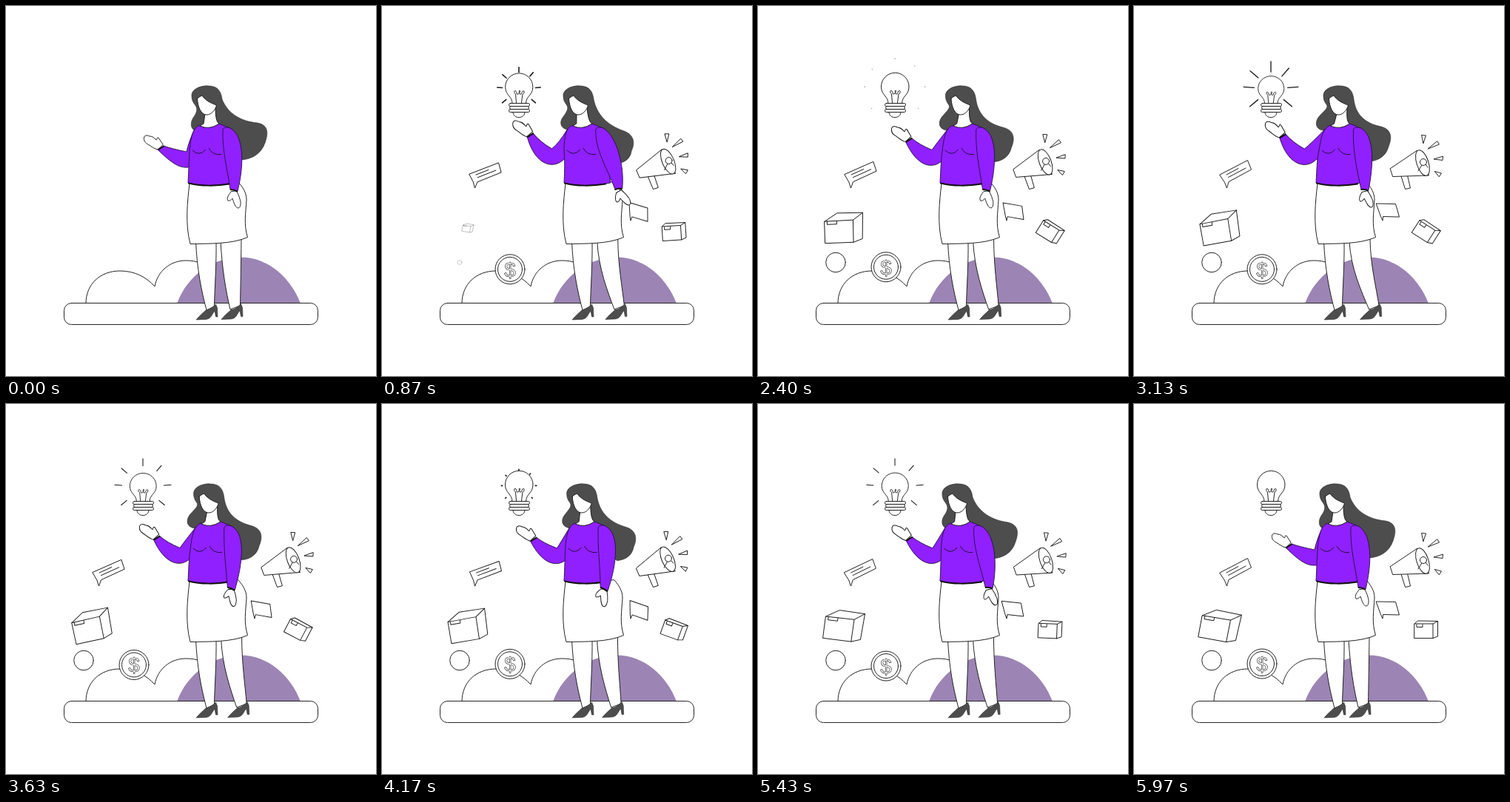
Animation, 500 px wide and 500 px high, one loop 6 s. Source, as an HTML page:

```html
<!DOCTYPE html>
<html lang="en">
<head>
<meta charset="utf-8">
<title>Presenting ideas</title>
<style>
  html, body { margin: 0; width: 100%; height: 100%; overflow: hidden; background: #fff; }
  svg { display: block; width: 100vw; height: 100vh; }
  .line { fill: #fff; stroke: #1a1a1a; stroke-width: .95; stroke-linejoin: round; stroke-linecap: round; }
  .open { fill: none; }
  .dark { fill: #4d4d4d; stroke: #2b2b2b; stroke-width: .6; }
  .top { fill: #9020ff; stroke: #241040; stroke-width: .9; stroke-linejoin: round; }
  .trim { fill: none; stroke: #111; stroke-width: 2; stroke-linecap: round; }
  text.line { font: 28px "Liberation Sans", Arial, sans-serif; text-anchor: middle; stroke-width: .6; }
</style>
</head>
<body>
<svg viewBox="0 0 500 500" xmlns="http://www.w3.org/2000/svg">
  <path class="line" d="M108 402C108 375 128 358 154 358C175 358 190 367 201 379C205 358 222 344 243 344C251 344 257 345 262 347V402Z"/>
  <path fill="#9c84b4" d="M231 402C245 364 280 339.500 317 339.500C355 339.500 385 368 398 402Z"/>
  <rect class="line" x="78.500" y="401.500" width="343" height="29" rx="10"/>

  <g id="bulb">
    <g id="glass">
      <path class="line" d="M176 132C176 121 166.500 121 166.500 109A18.700 18.700 0 0 1 204 109C204 121 194.500 121 194.500 132Z"/>
      <path class="line open" d="M181.500 131L180.500 119C177 116 179 113 181 115C183 117 181 119 183 119C187 119 184 114 186 114C188 114 184 119 187 119C190 119 188 116 190 115C193 113 193 118 190 119L188.500 131"/>
    </g>
    <path class="line" d="M177 143.500C177 153 193 153 193 143.500Z"/>
    <rect class="line" x="171.500" y="131.500" width="28" height="4" rx="2"/>
    <rect class="line" x="172.500" y="135.500" width="26" height="4" rx="2"/>
    <rect class="line" x="171.500" y="139.500" width="28" height="4" rx="2"/>
  </g>
  <path id="rays" class="line open"/>

  <g id="chat">
    <path class="line" d="M116 228L153.500 208.500L158.500 221L128 237.500L125.500 246L122.500 238.500Z"/>
    <path class="line open" d="M125 228L141 219.500M127.500 231.500L151 219"/>
  </g>

  <g id="horn">
    <path class="line" d="M361 230L366.500 247.500L373.500 246L369.500 229Z"/>
    <path class="line" d="M346.500 219.500L383 195L398.500 229L350 230.500Z"/>
    <ellipse class="line" cx="390" cy="212" rx="8" ry="18" transform="rotate(-18 390 212)"/>
    <path class="line open" d="M384 223L389 215M394 214L397 218"/>
    <circle class="line" cx="391" cy="211" r="4.500"/>
    <path class="line" d="M389 174.500L394.500 175L391 185.500ZM410 183L412.500 187L397.500 193ZM417.500 203.500L417 208.500L405.500 207ZM406.500 223.500L415.500 226L412.500 230.500Z"/>
  </g>

  <path id="flag" class="line" d="M327.500 267L353.500 267.500L358.500 285L336.500 284.500L336 290L333.500 284.500Z"/>

  <g id="smallBox">
    <path class="line" d="M379 297L383.500 293L410.500 293.500V314L404 316.500H379Z"/>
    <path class="line open" d="M379 297H404V316.500M404 297L410.500 293.500M382 298V301.500H390V298"/>
  </g>
  <g id="bigBox">
    <path class="line" d="M91 288.500L109 279L143.500 282L139.500 317L127 320.500L89 318Z"/>
    <path class="line open" d="M91 288.500L129.500 290.500L127 320.500M129.500 290.500L143.500 282M94.500 288.500L94 293L107 293.800L107.500 289.500"/>
  </g>
  <circle id="ball" class="line" cx="105" cy="346.500" r="13.300"/>
  <g id="coin">
    <circle class="line" cx="173" cy="351" r="20"/>
    <circle class="line" cx="173" cy="351" r="16.500"/>
    <text class="line" x="173" y="361">$</text>
  </g>

  <path id="hair" class="dark"/>
  <path class="line" d="M256.500 318C258 355 264 385 271 411L281.500 406C282 380 284.500 350 284 318Z"/>
  <path id="leg" class="line"/>
  <path id="shoe" class="dark" d="M257 424C262 418 266 415 270 411C275 411 279 407 283.500 403L285.500 408L286 420H283.500L282 412C278 417 277 423 270 423.500Z"/>
  <use id="frontShoe" href="#shoe"/>
  <path class="line" d="M248 240C245 265 242 295 249 321.500C275 321 305 322 326.500 312.500C321 295 324 280 325 262C325 252 320 245 314 238Z"/>
  <path id="hand" class="line" d="M3 -4L-3 -13C-6 -14 -4 -10 -6 -10C-9 -13 -11 -15 -15 -15C-19 -17 -22 -16 -22.500 -13C-23 -9 -21 -6 -17 -4C-12 -1 -9 2 -4 3Z"/>
  <path id="sleeve" class="top"/>
  <path id="wristband" class="trim"/>
  <path id="torso" class="top"/>
  <path class="trim" d="M247 239.500C262 243.500 285 243.500 302 240.500"/>
  <path id="chest" class="open" stroke="#241040"/>
  <path id="neck" class="line"/>
  <path id="face" class="line" d="M258.500 125C259 137 264 147 271 147C278 147 283 140 284.500 134C276 131 269 127 265 121C262 122 260 124 258.500 125Z"/>
  <path id="lowHand" class="line" d="M-4 1C-8 6 -10 10 -8 13C-6 14 -4 12 -2 10C0 16 2 23 6 23C9 23 10 15 8 11C7 6 5 4 4 0Z"/>
  <path id="arm" class="top"/>
  <path id="cuff" class="trim"/>
</svg>
<script>
const LOOP = 6000;
const RAY_START = 660, RAY_PERIOD = 1750;
const RAY_ANGLES = [-90, -49, -4, 40, 140, 184, 221];
const parts = {};
document.querySelectorAll('[id]').forEach(el => parts[el.id] = el);

const clamp = v => Math.max(0, Math.min(1, v));
const smooth = f => (1 - Math.cos(Math.PI * clamp(f))) / 2;
const mix = (a, b, f) => a + (b - a) * f;

// Eased value along [time, value] keys.
function track(t, keys) {
  const i = keys.findIndex(k => k[0] > t);
  if (i === 0) return keys[0][1];
  if (i < 0) return keys[keys.length - 1][1];
  const [t0, v0] = keys[i - 1], [t1, v1] = keys[i];
  return mix(v0, v1, smooth((t - t0) / (t1 - t0)));
}

const stride = [[0, 0], [1000, .76], [2000, .35], [3000, 1], [4000, .4], [4900, .9], [6000, 0]];
const reach = [[0, 0], [950, 1.06], [2000, .45], [3000, 1], [4000, .5], [5000, .95], [6000, 0]];
const headShift = [[0, 0], [900, -6], [3100, 5], [4450, -2], [5400, -2], [6000, 0]];
const hairShift = [[0, 0], [900, -13], [3100, -6], [4200, -10], [6000, 0]];
const armSwing = [[0, 0], [950, 12], [1900, -4], [2900, 5], [4100, -8], [5300, 4.5], [6000, 0]];
const tilt = [[0, 0], [1150, 1], [1700, 1], [3070, 0], [4200, 1], [4450, 1], [5960, 0]];
const bigBoxTurn = [[1000, 6], [3650, -16], [6000, 6.5]];
const smallBoxTurn = [[750, -4], [2700, 34], [6000, 0]];

const draw = (id, d) => parts[id].setAttribute('d', d);
const move = (id, value) => parts[id].setAttribute('transform', value);

function pop(id, t, start, cx, cy, extra = '') {
  const scale = smooth((t - start) / 400);
  parts[id].style.display = scale > 0 ? '' : 'none';
  move(id, `${extra} translate(${cx} ${cy}) scale(${scale}) translate(${-cx} ${-cy})`);
}

function drawBulb(t) {
  pop('bulb', t, 50, 185, 120);
  const age = t - RAY_START;
  const p = age < 0 ? 0 : age / RAY_PERIOD % 1;
  const squeeze = Math.sin(Math.PI * p) ** 2;
  move('glass', `translate(185 132) scale(${1 - .07 * squeeze} ${1 - .115 * squeeze}) translate(-185 -132)`);
  const head = p < .35 ? mix(23, 37, (p / .35) ** .75) : mix(37, 41, ((p - .35) / .65) ** 2);
  const tail = p < .4 ? 22.5 : p < .75 ? mix(22.5, 29.5, (p - .4) / .35) : mix(29.5, 41, (p - .75) / .25);
  const visible = age > 0 && t < 5930;
  parts.rays.style.strokeWidth = mix(1.7, .8, p);
  draw('rays', visible ? RAY_ANGLES.map(deg => {
    const a = deg * Math.PI / 180;
    const at = r => `${185 + r * Math.cos(a)} ${112 + r * Math.sin(a)}`;
    return `M${at(tail)}L${at(head)}`;
  }).join('') : 'M0 0');
}

function drawObjects(t) {
  const s = track(t, tilt);
  const bob = 2.5 * (1 - Math.cos(6 * Math.PI * t / LOOP));
  pop('chat', t, 200, 138, 229, `rotate(${7.5 * s} 125.5 246)`);
  pop('horn', t, 300, 372, 220, `rotate(${-6 * s} 367 248)`);
  pop('flag', t, 150, 343, 277, `rotate(${18 * s} 336 290)`);
  pop('smallBox', t, 350, 395, 305, `rotate(${track(t, smallBoxTurn)} 395 305)`);
  pop('bigBox', t, 730, 116, 300, `rotate(${track(t, bigBoxTurn)} 116 300)`);
  pop('ball', t, 745, 105, 346.5);
  pop('coin', t, 250, 173, 351, `translate(0 ${bob})`);
}

function drawWoman(t) {
  const q = track(t, stride);
  const u = track(t, reach);
  const h = track(t, headShift);
  const x = track(t, hairShift), y = -1.2 * x, l = .7 * x;
  const s = .7 * h;
  const w = track(t, armSwing);

  draw('hair', `M${251 + h} 122C${250 + h} 112 ${264 + h} 107 ${274 + h} 108
    C${287 + h} 108 ${291 + h} 117 ${292 + h} 126
    C${300 + .5 * (h + x)} ${146 + .1 * y} ${318 + x} ${156 + .35 * y} ${340 + x} ${158 + .7 * y}
    C${356 + x} ${161 + .9 * y} ${354 + x} ${174 + .9 * y} ${350 + x} ${185 + .7 * y}
    C${345 + .7 * x} ${200 + .4 * y} ${332 + .3 * x} ${207 + .3 * y} 318 ${208 + .3 * y}
    L285 195L256 168C${249 + l} 167 ${249 + l} 157 ${253 + l} 151
    C${259 + l} 143 ${259 + h} 138 ${255 + h} 133C${252 + h} 129 ${251 + h} 126 ${251 + h} 122Z`);
  move('face', `translate(${h} 0)`);
  draw('neck', `M${269 + h} 145.500L${267 + s} 159L${262 + s} 162Q${275 + s} 168 ${288 + s} 159
    Q${283 + s} 157 ${283 + h} 138`);

  const step = 15 * q;
  draw('leg', `M${290 + q} 318C${292 + q} 355 ${297 + .7 * step} 385 ${303 + step} 410
    L${316.5 + step} 405C${317 + .7 * step} 380 ${317.5 + 2 * q} 350 ${318 + q} 315Z`);
  move('frontShoe', `translate(${34 + step} -.5)`);

  const cx = mix(209, 200.5, u), cy = mix(191, 174.5, u);
  move('hand', `translate(${cx} ${cy}) rotate(${4 * u}) scale(${1 + .08 * u})`);
  draw('sleeve', `M${cx + 4} ${cy - 2}Q${mix(224, 214, u)} ${mix(193, 184, u)} ${mix(244, 230, u)} ${mix(197, 193, u)}
    Q${mix(247, 239, u)} ${mix(183, 186, u)} ${255 + s} 166L252 212L246.500 ${mix(218, 207, u)}
    C${mix(236, 233, u)} ${mix(219, 221, u)} ${mix(226, 208, u)} ${mix(215, 217, u)} ${cx - 4} ${cy + 3}Z`);
  draw('wristband', `M${cx - 3} ${cy + 3}L${cx + 4} ${cy - 1.5}`);

  draw('torso', `M${262 + s} 161C${252 + s} 164 ${250 + .8 * s} 178 ${248.5 + .6 * s} 192C247 208 247 222 246 239
    C262 243.500 285 243.500 ${304 + .4 * w} 239L${306 + s} 167Q${299 + s} 163 ${288 + s} 159
    Q${275 + s} 168 ${262 + s} 161Z`);
  const c = .5 * s;
  draw('chest', `M${252 + c} 195Q${261 + c} 204 ${270 + c} 194M${274 + c} 192Q${279 + c} 202 ${291 + c} 200.500`);

  move('lowHand', `translate(${308 + w} 250) rotate(${-2 * w})`);
  draw('arm', `M${293 + s} 167C${292 + s} 195 ${299 + .5 * w} 220 ${303 + w} 247.500
    L${313 + w} ${250 - .3 * w}C${322 + .5 * w} 215 ${321 + s} 178 ${306 + s} 167
    C${302 + s} 163 ${294 + s} 163 ${293 + s} 167Z`);
  draw('cuff', `M${303.5 + w} 248Q${308 + w} ${248 - .2 * w} ${312 + w} ${250.5 - .3 * w}`);
}

function render(now) {
  const t = now % LOOP;
  drawBulb(t);
  drawObjects(t);
  drawWoman(t);
}

const start = performance.now();
function frame() {
  render(performance.now() - start);
  requestAnimationFrame(frame);
}
frame();
</script>
</body>
</html>
```
